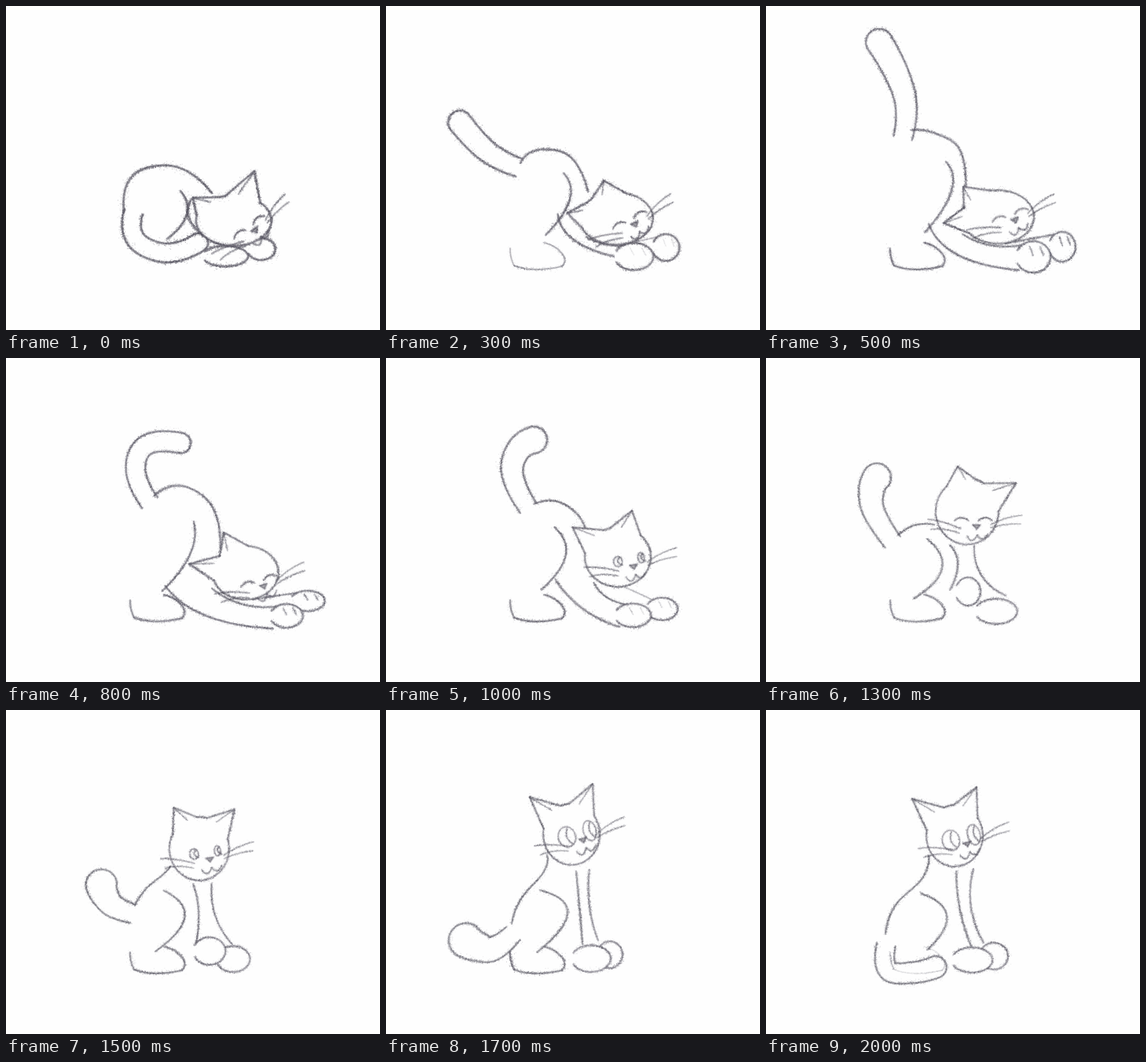
Animation of 476x412 px, one loop 2100 ms. Source, as an HTML page with a canvas:

```html
<!DOCTYPE html>
<html lang="en">
<head>
<meta charset="utf-8">
<title>Cat waking up</title>
<style>
html, body { margin: 0; width: 100%; height: 100%; overflow: hidden; background: #fefefe; }
canvas { display: block; width: 476px; height: 412px; }
</style>
</head>
<body>
<canvas id="stage" width="476" height="412"></canvas>
<script>
const STEP = 100, STEPS = 21, PAPER = '#fefefe', TAU = Math.PI * 2;
const ctx = document.getElementById('stage').getContext('2d');

// Key poses. tail: spine from base to tip; head and paws: x, y, rx, ry;
// ears: the two tips; face: nose x, y and tilt; open: eyes; stand: hind foot
// shows; reach: front legs stretched out; swing: sideways arc of the tail.
const poses = [
  { step: 0, dark: 1.45, stand: 0, reach: 0, open: 0, swing: -95, tipWidth: 12,
    tail: [162,262, 166,298, 203,314, 245,301],
    back: [150,262, 163,214, 215,204, 262,238],
    hip: [160,270], haunch: [222,235, 230,265, 205,296],
    legA: [236,246, 233,270, 254,294], legB: [262,299, 285,304, 308,302],
    paws: [279,318,29,13, 325,309,18,14],
    head: [290,273,48,32], ears: [238,244, 316,210], face: [317,285,-.64] },
  { step: 5, dark: 1.15, stand: 1, reach: 1, open: 0, swing: 0, tipWidth: 17,
    tail: [174,168, 178,125, 167,88, 144,46],
    back: [185,158, 215,162, 246,182, 254,235],
    hip: [159,215], haunch: [229,198, 236,235, 202,288],
    legA: [207,277, 245,317, 322,336], legB: [250,290, 285,304, 325,304],
    paws: [340,319,22,20, 377,306,17,19],
    head: [295,268,46,34], ears: [226,276, 251,230], face: [317,272,-.35] },
  { step: 8, dark: 1.15, stand: 1, reach: 1, open: 0, swing: 0, tipWidth: 13,
    tail: [183,184, 165,142, 178,111, 222,108],
    back: [189,175, 225,163, 262,188, 273,243],
    hip: [177,225], haunch: [239,208, 234,250, 199,296],
    legA: [203,290, 255,328, 340,344], legB: [262,293, 300,313, 345,316],
    paws: [357,328,21,15, 384,309,22,13],
    head: [305,273,42,34], ears: [233,262, 277,222], face: [328,290,-.3] },
  { step: 11, dark: 1.1, stand: 1, reach: .5, open: .75, swing: 0, tipWidth: 19,
    tail: [180,194, 159,150, 162,122, 171,102],
    back: [188,191, 220,194, 244,218, 246,252],
    hip: [162,240], haunch: [202,219, 226,252, 197,294],
    legA: [222,278, 246,313, 275,341], legB: [266,282, 275,302, 298,314],
    paws: [293,327,24,15, 335,324,19,15],
    head: [290,243,42,40], ears: [240,192, 331,180], face: [309,252,-.1] },
  { step: 13, dark: 1, stand: 1, reach: 0, open: 0, swing: 0, tipWidth: 18,
    tail: [161,234, 137,195, 134,170, 141,152],
    back: [168,225, 185,214, 200,211, 214,212],
    hip: [156,265], haunch: [205,230, 224,268, 188,306],
    legA: [234,238, 244,262, 234,295], legB: [265,238, 274,276, 305,302],
    paws: [257,297,16,18, 293,322,27,16],
    head: [256,195,40,42], ears: [244,138, 318,159], face: [268,214,0] },
  { step: 17, dark: 1, stand: 1, reach: 0, open: 1, swing: 0, tipWidth: 22,
    tail: [162,284, 137,303, 118,301, 102,293],
    back: [160,272, 172,240, 200,207, 205,185],
    hip: [165,300], haunch: [196,229, 231,258, 192,308],
    legA: [242,205, 246,250, 250,298], legB: [259,203, 259,248, 270,293],
    paws: [261,316,25,17, 285,311,16,17],
    head: [236,158,36,39], ears: [183,111, 263,94], face: [251,165,-.27] },
  { step: 20, dark: 1, stand: .25, reach: 0, open: 1, swing: 0, tipWidth: 14,
    tail: [153,298, 156,331, 185,334, 216,327],
    back: [152,285, 165,248, 198,215, 207,185],
    hip: [165,300], haunch: [197,233, 230,262, 205,305],
    legA: [242,205, 247,255, 262,303], legB: [264,202, 261,250, 277,296],
    paws: [262,318,26,16, 290,313,18,17],
    head: [240,160,36,39], ears: [186,113, 268,98], face: [256,170,-.24] }
];

const lerp = (a, b, f) => Array.isArray(a) ? a.map((v, i) => lerp(v, b[i], f)) : a + (b - a) * f;
const range = (n, fn) => Array.from({ length: n + 1 }, (_, i) => fn(i / n));
const pairs = flat => range(flat.length / 2 - 1, f => Math.round(f * (flat.length - 2)))
  .map(i => [flat[i], flat[i + 1]]);

function poseAt(step) {
  const next = Math.max(1, poses.findIndex(p => p.step >= step));
  const a = poses[next - 1], b = poses[next];
  const f = (step - a.step) / (b.step - a.step), pose = {};
  for (const key in a) pose[key] = lerp(a[key], b[key], f);
  pose.swing = a.swing * Math.sin(Math.PI * f);
  return pose;
}

// Smooth curve through points; three points give a parabola
function curve(pts) {
  const n = pts.length - 1;
  const beyond = (p, q, r) => [0, 1].map(c => 3 * p[c] - 3 * q[c] + r[c]);
  const all = [beyond(pts[0], pts[1], pts[2]), ...pts, beyond(pts[n], pts[n - 1], pts[n - 2])];
  return range(n * 12, u => {
    const i = Math.min(n - 1, Math.floor(u * n)), t = u * n - i;
    return [0, 1].map(c => {
      const [a, b, d, e] = [0, 1, 2, 3].map(k => all[i + k][c]);
      return b + t / 2 * (d - a + t * (2 * a - 5 * b + 4 * d - e + t * (3 * (b - d) + e - a)));
    });
  });
}

const arc = ([x, y, rx, ry], from, to) => range(36, f => {
  const a = lerp(from, to, f);
  return [x + rx * Math.cos(a), y + ry * Math.sin(a)];
});

function random(seed) {
  return () => {
    seed = seed + 0x6D2B79F5 | 0;
    let t = Math.imul(seed ^ seed >>> 15, 1 | seed);
    t = t + Math.imul(t ^ t >>> 7, 61 | t) ^ t;
    return ((t ^ t >>> 14) >>> 0) / 4294967296;
  };
}

let rnd, dark;

function path(pts) {
  ctx.beginPath();
  pts.forEach(([x, y]) => ctx.lineTo(x, y));
}

function cover(pts) {
  path(pts);
  ctx.fillStyle = PAPER;
  ctx.fill();
}

// Grain scattered along a line, with slowly changing pressure
function grain(pts, density, spread, alpha) {
  const phase = rnd() * TAU;
  let run = 0;
  for (let i = 1; i < pts.length; i++) {
    const a = pts[i - 1], b = pts[i], length = Math.hypot(b[0] - a[0], b[1] - a[1]);
    const press = alpha * (.8 + .35 * Math.sin(phase + run / 14));
    run += length;
    for (let n = 0; n < length * density; n++) {
      const [x, y] = lerp(a, b, rnd());
      const ox = (rnd() + rnd() - 1) * spread, oy = (rnd() + rnd() - 1) * spread;
      ctx.fillStyle = `rgba(82,80,92,${press * (.2 + .8 * rnd())})`;
      ctx.fillRect(x + ox - .5, y + oy - .5, 1, 1);
    }
  }
}

// Soft core, grain, a smudge, and a loose second line
function pencil(pts, weight = 1) {
  const w = weight * dark;
  if (w < .1) return;
  const spread = 1.2 + 1.6 * Math.min(w, 1.3);
  ctx.lineCap = ctx.lineJoin = 'round';
  ctx.strokeStyle = `rgba(108,106,118,${.3 * w})`;
  for (const width of [.9, .5]) {
    ctx.lineWidth = spread * width;
    path(pts);
    ctx.stroke();
  }
  grain(pts, 4, spread, Math.min(.6, .42 * w));
  grain(pts, 1.2, spread * 2.4, .16 * w * w);
  if (weight > .75) {
    const dx = 3 * rnd() - 1.5, dy = 3 * rnd() - 1.5;
    grain(pts.map(([x, y]) => [x + dx, y + dy]), 1.5, 1.2, .3 * w);
  }
}

const sketch = (pts, weight) => pencil(curve(pts), weight);
const line = (a, b, weight) => pencil([a, b], weight);

function tailEdge({ tail, swing, tipWidth }) {
  const spine = curve(pairs(tail).map(([x, y], i) => [x + swing * i / 3, y]));
  const last = spine.length - 1, left = [], right = [];
  let angle;
  spine.forEach(([x, y], i) => {
    const p = spine[Math.max(0, i - 1)], q = spine[Math.min(last, i + 1)];
    angle = Math.atan2(q[1] - p[1], q[0] - p[0]);
    const w = lerp(12, tipWidth, i / last), nx = w * Math.sin(angle), ny = w * Math.cos(angle);
    left.push([x + nx, y - ny]);
    right.unshift([x - nx, y + ny]);
  });
  const tip = [...spine[last], tipWidth, tipWidth];
  const cap = arc(tip, -Math.PI / 2, Math.PI / 2).map(([x, y]) => {
    const dx = x - tip[0], dy = y - tip[1], c = Math.cos(angle), s = Math.sin(angle);
    return [tip[0] + dx * c - dy * s, tip[1] + dx * s + dy * c];
  });
  return [...left, ...cap, ...right];
}

function drawBody(p, edge) {
  const [hip] = pairs(p.hip), haunch = pairs(p.haunch), end = haunch[2];
  sketch(pairs(p.back));
  sketch(haunch);
  sketch([hip, [lerp(hip[0], end[0], .3), end[1] - 25], end], .25);
  const heel = [163, 330], toe = [224, 331];
  sketch([edge[0], hip, [164, 283], [158, 308], heel], p.stand);
  sketch([heel, [190, 335], toe], p.stand);
  sketch([toe, [227, 320], [217, 308], [201, 301]], p.stand);
}

function drawPaw(oval, reach) {
  const [x, y, rx, ry] = oval;
  cover(arc(oval, 0, TAU));
  pencil(arc(oval, -2.7, 2.7), .95);
  for (const k of [-.2, .4]) {
    line([x + k * rx, y - .65 * ry], [x + (k + .2) * rx, y - .1 * ry], .7 * (2 * reach - 1));
  }
}

function drawLegs({ paws, head, legA, legB, reach }) {
  const near = paws.slice(0, 4), far = paws.slice(4);
  const chest = [head[0] + .2 * head[2], head[1] + head[3]];
  line(chest, [far[0] - .6 * far[2], far[1] - .8 * far[3]], .8 * reach);
  drawPaw(far, reach);
  sketch(pairs(legA));
  sketch(pairs(legB), .9);
  drawPaw(near, reach);
}

// Ears stand on the head oval, on both sides of the direction of their tips
function drawHead({ head, ears }) {
  const spread = .5, [x, y, rx, ry] = head;
  const on = a => [x + rx * Math.cos(a), y + ry * Math.sin(a)];
  const tips = pairs(ears);
  const [a1, a2] = tips.map(t => {
    const a = Math.atan2((t[1] - y) / ry, (t[0] - x) / rx);
    return a > Math.PI / 2 ? a - TAU : a;
  });
  const sides = [a1, a2].map(a => [on(a - spread), on(a + spread)]);
  cover(arc(head, 0, TAU));
  tips.forEach((tip, i) => cover([sides[i][0], tip, sides[i][1]]));
  pencil(arc(head, a1 - spread, a2 + spread - TAU), .9);
  if (a2 - a1 > 2 * spread) pencil(arc(head, a1 + spread, a2 - spread), .8);
  tips.forEach((tip, i) => {
    const [l, r] = sides[i];
    line(l, tip);
    line(tip, r);
    line(tip, lerp(tip, lerp(l, r, i ? .3 : .7), .85), .6);
  });
}

function drawFace({ face: [nx, ny, tilt], open }) {
  const c = Math.cos(tilt), s = Math.sin(tilt);
  const place = ([x, y]) => [nx + x * c - y * s, ny + x * s + y * c];
  const feature = (flat, weight) => sketch(pairs(flat).map(place), weight);
  for (const [x, rx] of [[-19, 11], [11, 8]]) {
    const y = -9;
    if (open < .3) {
      feature([x - 9, y + 2, x, y - 2, x + 9, y + 2], .8);
    } else {
      const ry = 13 * open;
      pencil(arc([x, y, rx * open, ry], 0, TAU).map(place), .7);
      feature([x + 3, y - .8 * ry, x, y, x + 5, y + .8 * ry], .7);
    }
  }
  const nose = [[-5, -2], [5, -2], [0, 4], [-5, -2]].map(place);
  path(nose);
  ctx.fillStyle = 'rgba(90,88,98,.5)';
  ctx.fill();
  pencil(nose, .7);
  feature([-12, 12, -6, 18, 1, 11], .75);
  feature([1, 11, 7, 16, 14, 10], .75);
  feature([-62, -9, -42, -5, -20, 3], .7);
  feature([-58, 4, -40, 4, -22, 9], .6);
  feature([18, -2, 37, -10, 58, -14], .6);
  feature([18, 2, 36, -2, 56, -3], .6);
}

function draw(step) {
  const pose = poseAt(step), edge = tailEdge(pose);
  rnd = random(step * 97 + 11);
  dark = pose.dark;
  ctx.fillStyle = PAPER;
  ctx.fillRect(0, 0, 476, 412);
  drawBody(pose, edge);
  pencil(edge);
  drawLegs(pose);
  drawHead(pose);
  drawFace(pose);
}

let shown = -1;
const start = performance.now();
function tick() {
  const step = Math.floor((performance.now() - start) / STEP) % STEPS;
  if (step !== shown) draw(shown = step);
  requestAnimationFrame(tick);
}
tick();
</script>
</body>
</html>
```
